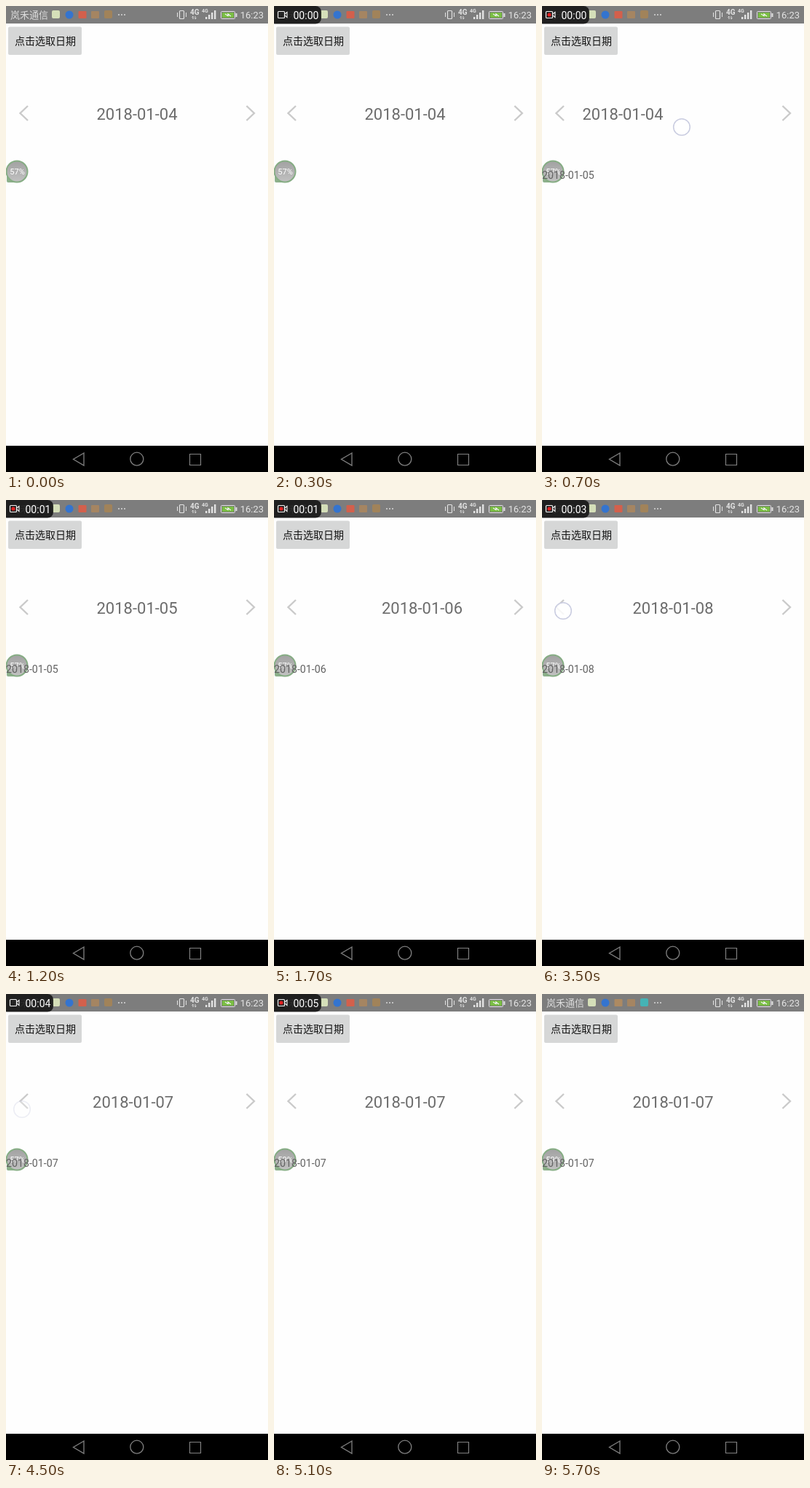
An HTML page with a canvas that plays this animation: 360 by 639 pixels, repeating every 5.8 s.

```html
<!DOCTYPE html>
<html lang="zh">
<head>
<meta charset="utf-8">
<title>日期选取</title>
<style>
html, body { margin: 0; width: 100%; height: 100%; overflow: hidden; background: #fefefe; }
canvas { display: block; width: 360px; height: 639px; }
</style>
</head>
<body>
<canvas id="stage" width="360" height="639"></canvas>
<script>
const ctx = document.getElementById('stage').getContext('2d');
const LOOP = 5800, STEP = 100, SETTLE = 600, FADE = 300, PAGE = 264;
const LATIN = 'Roboto, sans-serif';
const HAN = '"Noto Sans CJK SC", "Noto Sans CJK", sans-serif';

// Pager scrolls: start time, page position before, page position after
const scrolls = [[700, 69 / PAGE, 1], [1470, 1, 2], [2000, 2, 3], [2950, 3, 4], [4175, 4, 3]];
// Touches: down time, up time, start x, y, end x, y
const touches = [
  [400, 700, 261, 161, 192, 166],
  [1250, 1400, 280, 160, 210, 162],
  [1900, 2000, 346, 156, 346, 156],
  [2850, 2950, 343, 158, 343, 158],
  [3450, 3560, 29, 152, 29, 152],
  [4070, 4300, 22, 158, 22, 158]
];

const clamp = v => Math.max(0, Math.min(1, v));
const dateOf = page => '2018-01-0' + (4 + page);

function text(str, x, y, font, color, align = 'left') {
  ctx.font = font;
  ctx.fillStyle = color;
  ctx.textAlign = align;
  ctx.fillText(str, x, y);
}

function rect(x, y, w, h, color, r = 0) {
  ctx.fillStyle = color;
  ctx.beginPath();
  ctx.roundRect(x, y, w, h, r);
  ctx.fill();
}

function frame(x, y, w, h, color, width = 1, r = 0) {
  ctx.strokeStyle = color;
  ctx.lineWidth = width;
  ctx.beginPath();
  ctx.roundRect(x, y, w, h, r);
  ctx.stroke();
}

function line(points, color, width, closed) {
  ctx.beginPath();
  points.forEach(([x, y]) => ctx.lineTo(x, y));
  if (closed) ctx.closePath();
  ctx.strokeStyle = color;
  ctx.lineWidth = width;
  ctx.stroke();
}

function circle(x, y, r, fill, stroke, width = 1) {
  ctx.beginPath();
  ctx.arc(x, y, r, 0, 7);
  if (fill) { ctx.fillStyle = fill; ctx.fill(); }
  if (stroke) { ctx.strokeStyle = stroke; ctx.lineWidth = width; ctx.stroke(); }
}

function statusBar(t) {
  const ink = '#e2e2e2';
  rect(0, 0, 360, 24, '#7d7d7d');
  text('岚禾通信', 6, 17, '13px ' + HAN, '#dcdcdc');
  const late = t >= 5500;
  rect(63, 6, 11, 11, '#d5dfb9', 2);
  circle(87, 12, 5.5, '#3474cf');
  rect(99.5, 7, 11, 10, late ? '#ad8a62' : '#d3604c', 1);
  rect(117, 7, 11, 10, '#a58562', 1);
  rect(135, 6, 11, 11, late ? '#45b3b5' : '#a1835a', 2);
  for (const x of [155, 159, 163]) circle(x, 12, 0.9, ink);

  frame(238.5, 6.5, 6, 11, ink, 1.2, 1);
  line([[235.5, 9], [235.5, 15]], ink, 1);
  line([[247.5, 9], [247.5, 15]], ink, 1);
  text('4G', 253, 12, 'bold 10px ' + LATIN, ink);
  text('4G', 269, 9, 'bold 7px ' + LATIN, ink);
  line([[257, 18], [257, 14], [255.5, 15.5]], ink, 1);
  line([[260, 14], [260, 18], [261.5, 16.5]], ink, 1);
  for (let i = 0; i < 4; i++) rect(274 + i * 4, 15 - i * 3, 2.4, 3 + i * 3, ink);
  frame(295.5, 7.5, 19, 10, ink, 1, 1);
  rect(297, 9, 16, 7, '#79bd43');
  rect(315.5, 10, 2, 5, ink);
  line([[301, 11], [305, 13.5], [305, 11], [309, 14]], '#f4f4f4', 1.2);
  text('16:23', 354, 17, '13px ' + LATIN, '#e4e4e4', 'right');
}

function recorder(t) {
  if (t < 300 || t >= 5500) return;
  rect(-6, 0, 71, 24.5, 'rgba(18,18,18,0.87)', 8);
  frame(5.5, 7.5, 9, 9, '#eee', 1.2, 1);
  line([[15, 11], [18, 8.5], [18, 15.5], [15, 13]], '#eee', 1.1);
  if ((t + 1300) % 2000 < 1050) circle(10, 12, 2.6, '#e02020');
  const seconds = Math.max(0, Math.floor((t - 250) / 950));
  text('00:0' + seconds, 26.5, 17.5, '14px ' + LATIN, '#fff');
}

function pager(t, shown) {
  let pos = clamp((t - 400) / 300) * 69 / PAGE;
  if (shown) {
    const [start, from, to] = shown;
    pos = to + (from - to) * (1 - clamp((t - start) / SETTLE)) ** 5;
  }
  ctx.save();
  ctx.beginPath();
  ctx.rect(48, 120, PAGE, 56);
  ctx.clip();
  const first = Math.floor(pos);
  for (const page of [first, first + 1]) {
    text(dateOf(page), 180 + (page - pos) * PAGE, 155.5, '22px ' + LATIN, '#6c6c6c', 'center');
  }
  ctx.restore();
  line([[30, 137], [19.5, 147], [30, 157]], '#cacaca', 2.4);
  line([[330.5, 137], [341, 147], [330.5, 157]], '#cacaca', 2.4);
}

function badge(t) {
  const glass = ctx.createLinearGradient(0, 213, 0, 242);
  glass.addColorStop(0, '#a2a2a2');
  glass.addColorStop(1, '#c2c2c2');
  rect(1, 231, 11, 11, '#8db08b', 2);
  circle(15, 227, 14.5, glass, '#86ad84', 2);
  text(t < 4900 ? '57%' : '59%', 15.5, 231, '11px ' + LATIN, '#fff', 'center');
}

function touchMarks(t) {
  for (const [down, up, x0, y0, x1, y1] of touches) {
    if (t < down || t >= up + FADE) continue;
    const k = clamp((t - down) / (up - down));
    ctx.globalAlpha = 1 - clamp((t - up) / FADE);
    circle(x0 + (x1 - x0) * k, y0 + (y1 - y0) * k, 11.3, 'rgba(255,255,255,0.85)', '#c9cce0', 1.5);
    ctx.globalAlpha = 1;
  }
}

function navBar() {
  const ink = '#808080';
  rect(0, 603, 360, 36, '#000');
  line([[107, 613], [92.5, 621.5], [107, 630]], ink, 1.3, true);
  circle(179.8, 621.2, 9, null, ink, 1.3);
  frame(252.5, 614.5, 15, 15, ink, 1.2);
}

function draw(now) {
  const t = Math.floor(now % LOOP / STEP) * STEP;
  const shown = scrolls.filter(([start]) => t >= start).pop();
  rect(0, 0, 360, 639, '#fefefe');
  rect(3, 28.5, 101, 38.5, '#d6d7d7', 2);
  text('点击选取日期', 12, 53, '500 14px ' + HAN, '#151515');
  pager(t, shown);
  badge(t);
  if (shown) text(dateOf(shown[2]), 0, 237, '14.2px ' + LATIN, '#626262');
  statusBar(t);
  touchMarks(t);
  recorder(t);
  navBar();
}

let begin;
function tick(now) {
  begin ??= now;
  draw(now - begin);
  requestAnimationFrame(tick);
}
requestAnimationFrame(tick);
</script>
</body>
</html>
```
